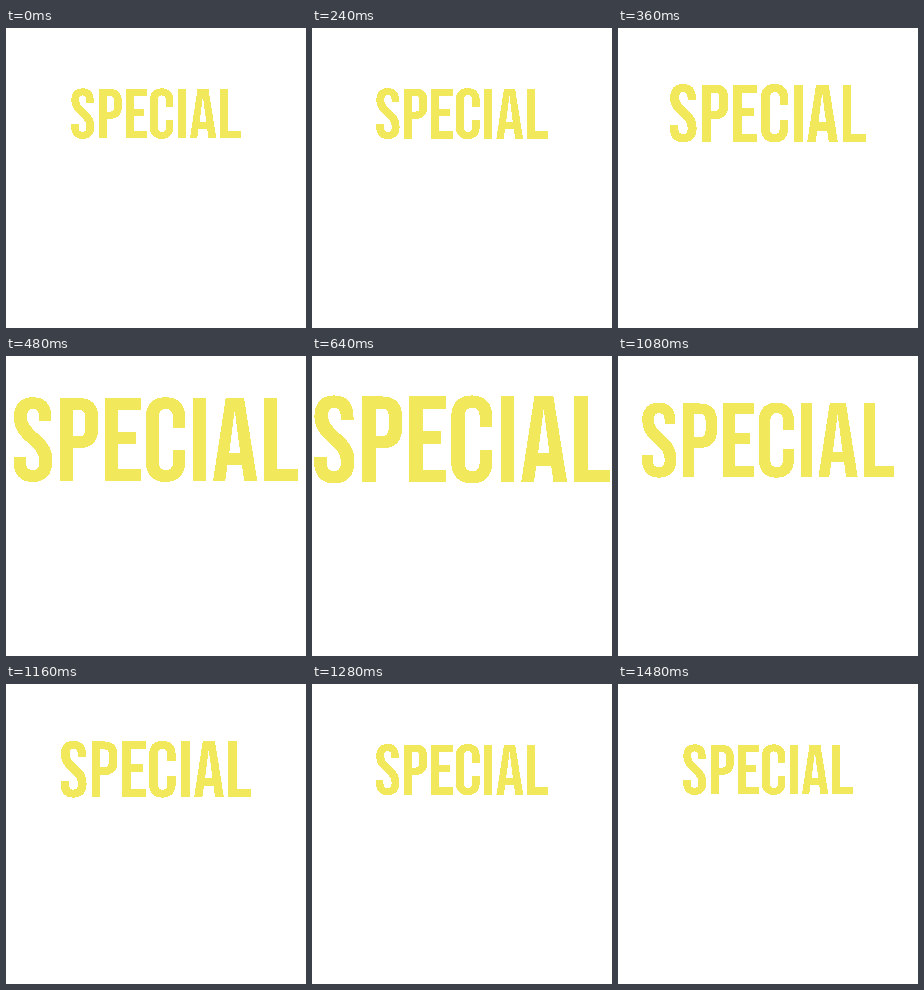
Write an HTML page that moves like this. It is 300 px wide and 300 px high and loops after 1.64 s.

```html
<!DOCTYPE html>
<html lang="en">
<head>
<meta charset="utf-8">
<title>SPECIAL</title>
<style>
  html, body { margin: 0; width: 100%; height: 100%; overflow: hidden; background: #fff; }
  svg { display: block; width: 100vw; height: 100vh; }
</style>
</head>
<body>
<svg viewBox="0 0 300 300" role="img" aria-label="SPECIAL">
  <g id="word" fill="#f2e85c" fill-rule="evenodd" shape-rendering="crispEdges"></g>
</svg>
<script>
// Condensed capitals, y up, cap height 700.
const glyphs = {
  S: 'M188-8Q108-8 67 37.5T26 168V207H130V160Q130 92 187 92Q215 92 229.5 108.5T244 162Q244 206 224 239.5T150 320Q82 380 55 428.5T28 538Q28 619 69 663.5T188 708T305.5 663.5T346 535.5V507H242V542.5Q242 576 228.5 592T190 608Q138 608 138 545Q138 509 157.5 478T232 398Q302 337 328 287T354 170Q354 84 311.5 38T188-8Z',
  P: 'M41 700H203Q285 700 326 656T367 527V450Q367 365 326 321T203 277H151V0H41ZM151 600V377H203Q230 377 243.5 392T257 443V534Q257 570 243.5 585T203 600Z',
  E: 'M41 700H341V600H151V415H302V315H151V100H341V0H41Z',
  C: 'M200-8Q118-8 75 38.5T32 170V530Q32 615 75 661.5T200 708T325 661.5T368 530V448H264V537Q264 608 203 608T142 537V162Q142 92 203 92T264 162V264H368V170Q368 85 325 38.5T200-8Z',
  I: 'M41 0V700H151V0Z',
  A: 'M124 700H279L391 0H280L261 139V137H139L120 0H17ZM247 236L201 592H199L154 236Z',
  L: 'M41 700H151V100H330V0H41Z'
};
const origins = { S: 0, P: 376, E: 759, C: 1109, I: 1502, A: 1694, L: 2102 };
const LOOP = 1640, STEP = 40, START = 80, PEAK = 720, END = 1480;
const SMALL = 0.0705, LARGE = 0.123;

const word = document.getElementById('word');
word.innerHTML = Object.entries(origins)
  .map(([letter, x]) => `<path transform="translate(${x - 1229} -350)" d="${glyphs[letter]}"/>`)
  .join('');

const expoInOut = u =>
  u <= 0 ? 0 : u >= 1 ? 1 :
  u < 0.5 ? 2 ** (20 * u - 11) : 1 - 2 ** (9 - 20 * u);

function draw(now) {
  const t = Math.floor(now % LOOP / STEP) * STEP;
  const grow = t < PEAK
    ? expoInOut((t - START) / (PEAK - START))
    : 1 - expoInOut((t - PEAK) / (END - PEAK));
  const scale = SMALL + (LARGE - SMALL) * grow;
  word.setAttribute('transform', `translate(150 ${85.6 - 2.2 * grow}) scale(${scale} ${-scale})`);
}

function tick() {
  draw(performance.now());
  requestAnimationFrame(tick);
}
tick();
</script>
</body>
</html>
```
